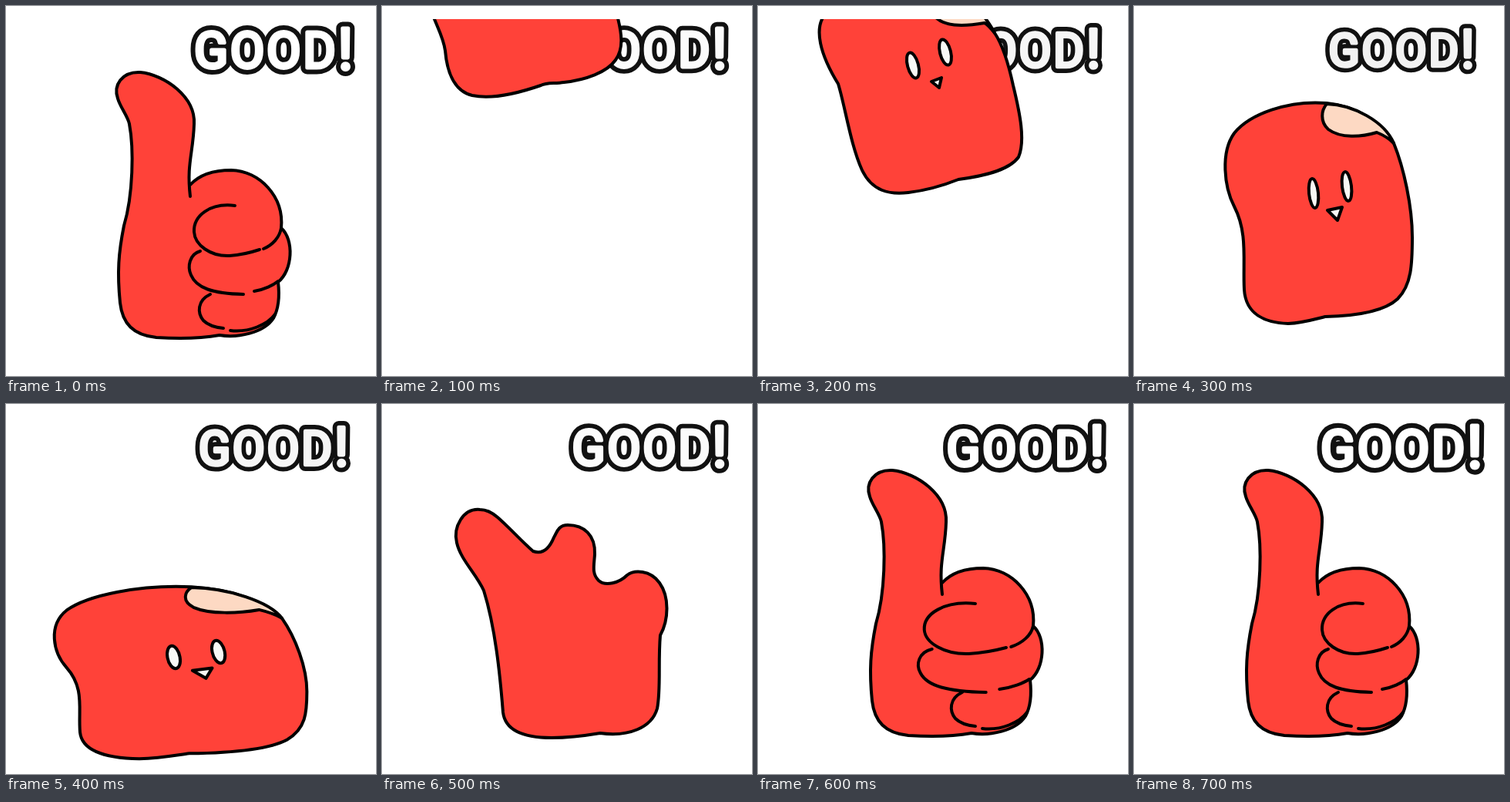
An HTML page for the animation above (1500 ms loop, 480x480 px).

```html
<!DOCTYPE html>
<html lang="en">
<head>
<meta charset="utf-8">
<title>Good!</title>
<style>
html, body { margin: 0; height: 100%; overflow: hidden; background: #fff; }
svg { display: block; width: 100%; height: 100%; }
path, ellipse { stroke: #000; stroke-width: 4; stroke-linecap: round; stroke-linejoin: round; vector-effect: non-scaling-stroke; }
.skin { fill: #ff4239; }
.line { fill: none; }
.patch { fill: #fdd9c3; }
.face { fill: #f8f8f5; }
text { font: 400 64px Roboto, sans-serif; letter-spacing: 3.2px; text-anchor: middle; stroke-linejoin: round; }
.mark { font-size: 74px; }
.rim { stroke: #111; stroke-width: 17px; }
.letters { fill: currentColor; stroke: currentColor; stroke-width: 5px; }
</style>
</head>
<body>
<svg viewBox="0 0 480 480">
  <clipPath id="area"><rect y="17" width="480" height="463"/></clipPath>
  <g id="word">
    <text class="rim" x="1.6" y="23">GOOD<tspan class="mark" dy="1.5">!</tspan></text>
    <text class="letters" x="1.6" y="23" aria-hidden="true">GOOD<tspan class="mark" dy="1.5">!</tspan></text>
  </g>
  <g id="hand" clip-path="url(#area)"></g>
</svg>
<script>
const shape = (cls, d) => `<path class="${cls}" d="${d}"/>`;
const eye = (x, y, rx, ry, tilt) =>
  `<ellipse class="face" rx="${rx}" ry="${ry}" transform="translate(${x} ${y}) rotate(${tilt})"/>`;
const group = (transform, content) => `<g transform="${transform}">${content}</g>`;

const fist = shape('skin', 'M239 247C234 205 243 190 244 153C246 118 206 89 174 86C150 85 139 103 145 120C148 131 158 143 160 153C166 185 165 245 153 285C146 320 144 345 148 385C151 412 165 427 195 430C225 432 255 431 277 427C300 431 335 424 347 405C354 392 355 375 353 358C372 343 374 303 357 288C361 247 329 214 292 213C265 213 248 222 239 232');
const topFingers = shape('line', 'M297 259C265 255 243 272 244 293C245 310 265 325 290 324C305 323 320 319 329 316M334 315C346 310 355 300 357 288M252 318C238 322 235 338 240 349C247 366 268 373 308 374M322 370C335 368 347 362 353 357');
const lowFinger = shape('line', 'M265 374C248 382 248 398 256 408C262 414 272 417 282 418M291 421C315 424 340 413 349 400');

const thumbUp = fist + topFingers + lowFinger;
const curling = fist + group('translate(357 0) scale(1.25 1) translate(-357 0)', topFingers) + lowFinger;

const dropping = shape('skin', 'M66 12C72 28 80 42 82 58C84 82 92 110 117 116C145 122 180 112 206 103C214 99 224 101 236 99C264 96 292 86 303 70C314 55 311 35 305 12');

const tilted =
  shape('skin', 'M86 12C73 30 80 62 104 101C113 130 120 180 135 213C148 240 170 245 195 242C220 239 245 231 260 225C290 221 325 214 338 196C347 175 340 140 331 103C325 75 317 50 307 35C303 28 297 20 292 12') +
  shape('patch', 'M228 12C240 27 265 27 294 22C299 25 303 30 307 35C303 27 298 20 292 12') +
  eye(201, 77, 7, 17, -15) + eye(243, 60, 7, 17, -14) +
  shape('face', 'M225 98L238 93L235 106Z');

const upright =
  shape('skin', 'M250 126C200 122 150 140 130 165C112 190 117 235 130 260C148 295 141 330 143 368C145 400 170 411 200 412C220 411 235 406 248 403C290 402 325 396 342 380C360 362 361 335 361 300C361 260 350 210 337 178C320 150 290 130 250 126Z') +
  shape('patch', 'M250 127C243 135 241 150 252 160C268 172 295 170 315 164C325 168 332 173 337 178C325 150 285 128 250 127Z') +
  eye(233, 243, 6, 19, -6) + eye(276, 234, 6, 19, -7) +
  shape('face', 'M251 265L270 261L264 278Z');

const squashed = group('translate(-97 139) scale(1.35 .78)', upright);

const opening = shape('skin', 'M127 137C105 135 92 160 97 180C102 202 122 220 132 242C147 290 153 350 157 400C160 425 185 433 220 433C245 433 265 430 283 427C320 432 350 420 357 395C362 370 358 335 361 300C372 280 373 250 360 232C348 215 327 215 318 222C308 232 290 237 281 229C272 220 275 210 276 195C277 170 262 157 241 157C228 157 227 167 223 173C216 190 207 195 196 191C180 177 165 160 150 147C142 140 135 137 127 137Z');

// Each pose holds 100 ms, the last one until the loop ends.
const poses = [thumbUp, dropping, tilted, upright, squashed, opening, curling, thumbUp];
const sizes = [1, .975, .945, .92, .945, .975, .995, 1.02];
const hand = document.getElementById('hand');
const word = document.getElementById('word');
let shown = -1;

function draw() {
  const step = Math.min(7, Math.floor(performance.now() % 1500 / 100));
  if (step !== shown) {
    shown = step;
    const size = sizes[step];
    const grey = Math.min(255, Math.round(255 - (1 - size) * 160));
    hand.innerHTML = poses[step];
    word.setAttribute('transform', `translate(347 57) scale(${size})`);
    word.setAttribute('color', `rgb(${grey},${grey},${grey})`);
  }
  requestAnimationFrame(draw);
}
draw();
</script>
</body>
</html>
```
